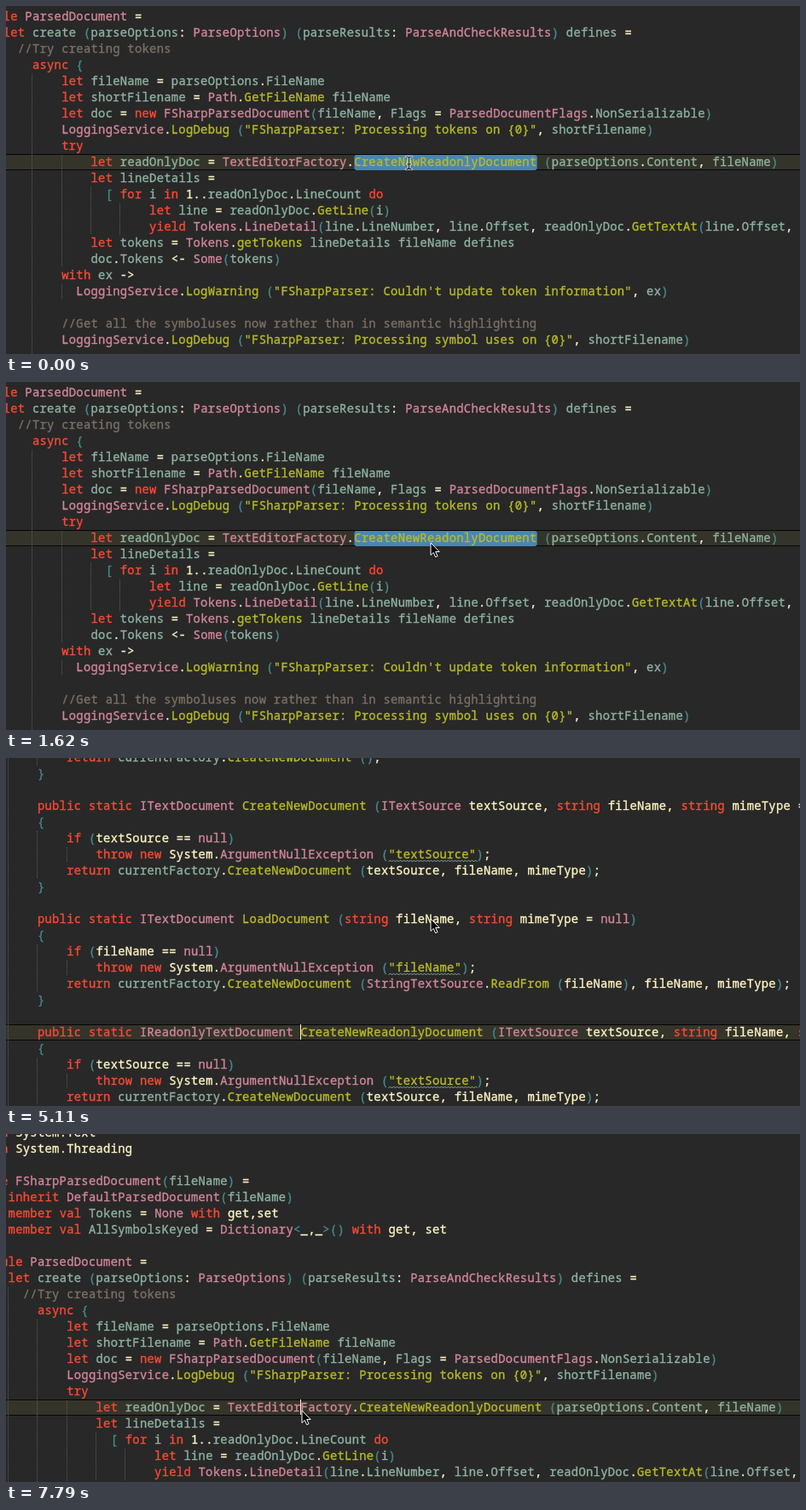
An HTML page that plays this animation: 931 px wide and 409 px high, repeating every 8000 ms.

```html
<!DOCTYPE html>
<html lang="en">
<head>
<meta charset="utf-8">
<title>Go to declaration</title>
<style>
html, body { margin: 0; width: 100%; height: 100%; overflow: hidden; background: #282828; }
svg { display: block; width: 100%; height: 100%; }
text { white-space: pre; }
.code { font: 13.8px "Noto Sans Mono", "DejaVu Sans Mono", monospace; letter-spacing: .295px; stroke-width: .35; }
.menu { font: 12px Inter, "DejaVu Sans", sans-serif; fill: #0b0b0b; }
.guide { stroke: #5c5c53; stroke-width: 1; stroke-dasharray: 1 1; }
.wave { fill: none; stroke: #8fb3a2; stroke-width: .9; }
#arrow { filter: drop-shadow(0 1px 1px rgba(0,0,0,.35)); }
#panel { filter: drop-shadow(0 3px 5px rgba(0,0,0,.5)); }
</style>
</head>
<body>
<svg id="stage" viewBox="0 0 931 409" preserveAspectRatio="none"></svg>
<script>
const LOOP = 8000, CHAR = 8.575, LEFT = -31.7, ROW = 19, CURRENT = 17;
const INK = { plain: '#fdf4c1', name: '#8fb3a2', type: '#d3869b', method: '#b8bb26',
  key: '#fb4934', bracket: '#458b8d', note: '#7c6f64' };
const KEYS = new Set(('open type inherit member val with module let async new try for in do yield ' +
  'public static string if throw return').split(' '));
const MARKS = { '~': 'type', '@': 'method', '$': 'name', '!': 'plain' };

// ~type  @method  $field  !plain
const fsharp = `open !System.!Text
open !System.!Threading

type ~FSharpParsedDocument(fileName) =
    inherit ~DefaultParsedDocument(fileName)
    member val Tokens = ~None with !get,!set
    member val AllSymbolsKeyed = ~Dictionary<_,_>() with !get, !set

module ~ParsedDocument =
    let create (parseOptions: ~ParseOptions) (parseResults: ~ParseAndCheckResults) defines =
      //Try creating tokens
        async {
            let fileName = parseOptions.FileName
            let shortFilename = ~Path.@GetFileName fileName
            let doc = new ~FSharpParsedDocument(fileName, Flags = ~ParsedDocumentFlags.NonSerializable)
            ~LoggingService.@LogDebug ("FSharpParser: Processing tokens on {0}", shortFilename)
            try
                let readOnlyDoc = ~TextEditorFactory.@CreateNewReadonlyDocument (parseOptions.Content, fileName)
                let lineDetails =
                  [ for i in 1..readOnlyDoc.LineCount do
                        let line = readOnlyDoc.@GetLine(i)
                        yield ~Tokens.~LineDetail(line.LineNumber, line.Offset, readOnlyDoc.@GetTextAt(line.Offset,
                let tokens = ~Tokens.@getTokens lineDetails fileName defines
                doc.Tokens <- ~Some(tokens)
            with ex ->
              ~LoggingService.@LogWarning ("FSharpParser: Couldn't update token information", ex)

            //Get all the symboluses now rather than in semantic highlighting
            ~LoggingService.@LogDebug ("FSharpParser: Processing symbol uses on {0}", shortFilename)`;

const guard = name => `        {
            if (${name} == null)
                throw new System.~ArgumentNullException ("${name}");
`;
const csharp = `            return $currentFactory.@CreateNewDocument ();
        }

        public static ~ITextDocument @CreateNewDocument (~ITextSource textSource, string fileName, string mimeType = null)
${guard('textSource')}            return $currentFactory.@CreateNewDocument (textSource, fileName, mimeType);
        }

        public static ~ITextDocument @LoadDocument (string fileName, string mimeType = null)
${guard('fileName')}            return $currentFactory.@CreateNewDocument (~StringTextSource.@ReadFrom (fileName), fileName, mimeType);
        }

        public static ~IReadonlyTextDocument @CreateNewReadonlyDocument (~ITextSource textSource, string fileName, string mimeType = null)
${guard('textSource')}            return $currentFactory.@CreateNewDocument (textSource, fileName, mimeType);`;

const stage = document.getElementById('stage');
function el(parent, tag, attrs = {}, text) {
  const node = document.createElementNS('http://www.w3.org/2000/svg', tag);
  for (const k in attrs) node.setAttribute(k, attrs[k]);
  if (text !== undefined) node.textContent = text;
  return parent.appendChild(node);
}
const group = (parent, attrs) => el(parent, 'g', attrs);
const show = (node, on) => node.setAttribute('visibility', on ? 'visible' : 'hidden');
const colX = col => LEFT + col * CHAR;
const rowY = row => row * ROW - 1;

function inkOf(token, base, resolved) {
  const mark = MARKS[token[0]];
  if (mark) return resolved ? INK[mark] : INK.plain;
  if (token.startsWith('//')) return INK.note;
  if (token[0] === '"') return INK.method;
  if (KEYS.has(token)) return INK.key;
  if (token === 'null') return INK.type;
  if (/^[()[\]{}<>]$/.test(token)) return INK.bracket;
  return /^[A-Za-z]/.test(token) ? base : INK.plain;
}

function writeCode(parent, source, base, resolved = true) {
  const out = group(parent, { class: 'code' });
  source.split('\n').forEach((line, row) => {
    const indent = line.search(/\S/);
    if (indent < 0) return;
    const text = el(out, 'text', { x: colX(indent), y: rowY(row) + 4 });
    for (const token of line.trim().match(/"[^"]*"|\/\/.*|[~@$!]?[A-Za-z]\w*|<-|->|\s+|./g)) {
      const ink = inkOf(token, base, resolved);
      el(text, 'tspan', { fill: ink, stroke: ink }, token.replace(/^[~@$!]/, ''));
    }
  });
  return out;
}

function guide(parent, col, from, to) {
  const x = Math.floor(colX(col)) + .5;
  el(parent, 'line', { class: 'guide', x1: x, x2: x, y1: rowY(from) - 9, y2: rowY(to) + 9 });
}

const currentLine = parent => el(parent, 'rect', { x: -20, y: rowY(CURRENT) - 9.5, width: 980, height: 18,
  fill: '#34342b', stroke: '#050505' });
const caretAt = (parent, col) => el(parent, 'rect', { x: Math.floor(colX(col)), y: rowY(CURRENT) - 10,
  width: 1, height: 18, fill: INK.plain });

function buildFsharp() {
  const root = group(stage);
  currentLine(root);
  for (const g of [[4, 10, 30], [8, 12, 30], [12, 17, 23], [12, 25, 25], [16, 19, 21], [20, 20, 21]])
    guide(root, ...g);
  const selection = el(root, 'rect', { x: colX(52) + .2, y: rowY(CURRENT) - 9, width: 25 * CHAR, height: 18,
    rx: 3, fill: '#4a86b0' });
  writeCode(root, fsharp, INK.name);
  return { root, selection, midCaret: caretAt(root, 60), endCaret: caretAt(root, 44) };
}

function buildCsharp() {
  const root = group(stage, { transform: 'translate(0 1)' });
  currentLine(root);
  guide(root, 4, 0, 22);
  guide(root, 8, 0, 0);
  for (const row of [5, 12, 19]) {
    guide(root, 8, row, row + 2);
    guide(root, 12, row + 1, row + 1);
  }
  const raw = writeCode(root, csharp, INK.plain, false);
  const resolved = writeCode(root, csharp, INK.plain);
  const waves = group(root);
  for (const [row, chars] of [[6, 12], [13, 10], [20, 12]]) {
    const zigzag = 'l2 -2l2 2'.repeat(Math.round(chars * CHAR / 4));
    el(waves, 'path', { class: 'wave', d: `M${colX(56)} ${rowY(row) + 8}${zigzag}` });
  }
  const box = el(root, 'rect', { rx: 2, fill: 'none', stroke: '#d9d0a4' });
  return { root, raw, resolved, waves, box, caret: caretAt(root, 44) };
}

function buildMenu() {
  const root = group(stage);
  const shade = el(el(root, 'defs'), 'linearGradient', { id: 'tint' });
  for (const [offset, color] of [[0, '#bababa'], [.35, '#b3bec0'], [.55, '#b5bebe'], [.7, '#bababa']])
    el(shade, 'stop', { offset, 'stop-color': color });
  const panel = group(root, { id: 'panel' });
  el(panel, 'rect', { x: 474, y: 176, width: 266, height: 260, rx: 5, fill: '#bababa' });
  el(panel, 'rect', { x: 474, y: 180, width: 266, height: 17, fill: 'url(#tint)' });
  const hover = el(root, 'rect', { x: 474, y: 180, width: 266, height: 17, fill: '#3f86f4' });
  const rows = group(root, { class: 'menu' });
  const items = [
    [189, 'Go to Declaration', '⌘D'], [206, 'Find References', '⇧⌘R'],
    [223, 'Find overriden Symbols', ''], [240, 'Find Method Overloads', ''],
    [269, 'Send selection to F# Interactive', '⌃↩'], [286, 'Send line to F# Interactive', '⌃⌘L'],
    [303, 'Send current file to F# Interactive', ''], [320, 'Send references to F# Interactive', '⌃⌘P'],
    [349, 'Run To Cursor', ''], [378, 'Cut', '⌘X'], [395, 'Copy', '⌘C'], [412, 'Paste', '⌘V']];
  const first = group(rows);
  items.forEach(([y, label, keys], i) => {
    const row = i ? rows : first;
    el(row, 'text', { x: 495, y: y + 4 }, label);
    el(row, 'text', { x: 733, y: y + 4, 'text-anchor': 'end' }, keys);
  });
  for (const y of [254, 335, 363]) el(rows, 'rect', { x: 474, y, width: 266, height: 1, fill: '#a3a3a3' });
  return { root, panel, hover, first };
}

const fs = buildFsharp(), cs = buildCsharp(), menu = buildMenu();
const blank = el(stage, 'rect', { width: 931, height: 409, fill: '#f3f3f3' });
const beam = group(stage, { fill: 'none', 'stroke-linecap': 'round' });
for (const [stroke, width] of [['#e8eef0', 2.6], ['#111', 1.1]])
  el(beam, 'path', { stroke, 'stroke-width': width,
    d: 'M469.5 177q3 0 3 2q0 -2 3 -2M472.5 179v11M469.5 192q3 0 3 -2q0 2 3 2M470.5 186h4' });
const arrow = el(stage, 'path', { id: 'arrow', fill: '#000', stroke: '#fff', 'stroke-width': 1,
  d: 'M0 0V14.5L3.3 11.4L5.6 16.7L8 15.7L5.7 10.5H10.2Z' });

const spots = [[270, 472, 184], [540, 487, 188], [810, 498, 189], [6990, 415, 307], [7260, 348, 325], [7530, 347, 325]];
const within = (t, from, to) => t >= from && t < to;

function draw(t) {
  const inFirst = t < 1890, inCs = within(t, 1890, 5920), inLast = t >= 6190;
  fs.root.setAttribute('display', inFirst || inLast ? 'inline' : 'none');
  fs.root.setAttribute('transform', inFirst ? 'translate(-6 -138)' : '');
  show(fs.selection, t < 7790);
  show(fs.midCaret, within(t, 810, 1620) || within(t, 6190, 6990));
  show(fs.endCaret, t >= 7790);

  cs.root.setAttribute('display', inCs ? 'inline' : 'none');
  show(cs.raw, t < 2690);
  show(cs.resolved, t >= 2690);
  show(cs.waves, t >= 2960);
  show(cs.caret, t < 2690 || within(t, 3500, 4300) || t >= 5110);
  const grow = t < 2160 ? 0 : 2;
  const frame = { x: 340.5 - grow, y: 309.5 - grow, width: 10 + 2 * grow, height: 23 + 2 * grow, opacity: grow ? .5 : 1 };
  for (const k in frame) cs.box.setAttribute(k, frame[k]);
  show(cs.box, t < 2430);

  const hovered = within(t, 540, 1080);
  menu.root.setAttribute('display', within(t, 270, 1620) ? 'inline' : 'none');
  menu.root.setAttribute('opacity', t < 1350 ? 1 : .06);
  show(menu.hover, hovered);
  menu.first.setAttribute('fill', hovered ? '#fff' : '#0b0b0b');

  show(blank, within(t, 5920, 6190));
  show(beam, t < 270);
  show(arrow, t >= 270);
  const spot = spots.filter(s => s[0] <= t).pop() || spots[0];
  arrow.setAttribute('transform', `translate(${spot[1]} ${spot[2]})`);
}

const start = performance.now();
function tick() {
  draw((performance.now() - start) % LOOP);
  requestAnimationFrame(tick);
}
draw(0);
requestAnimationFrame(tick);
</script>
</body>
</html>
```
